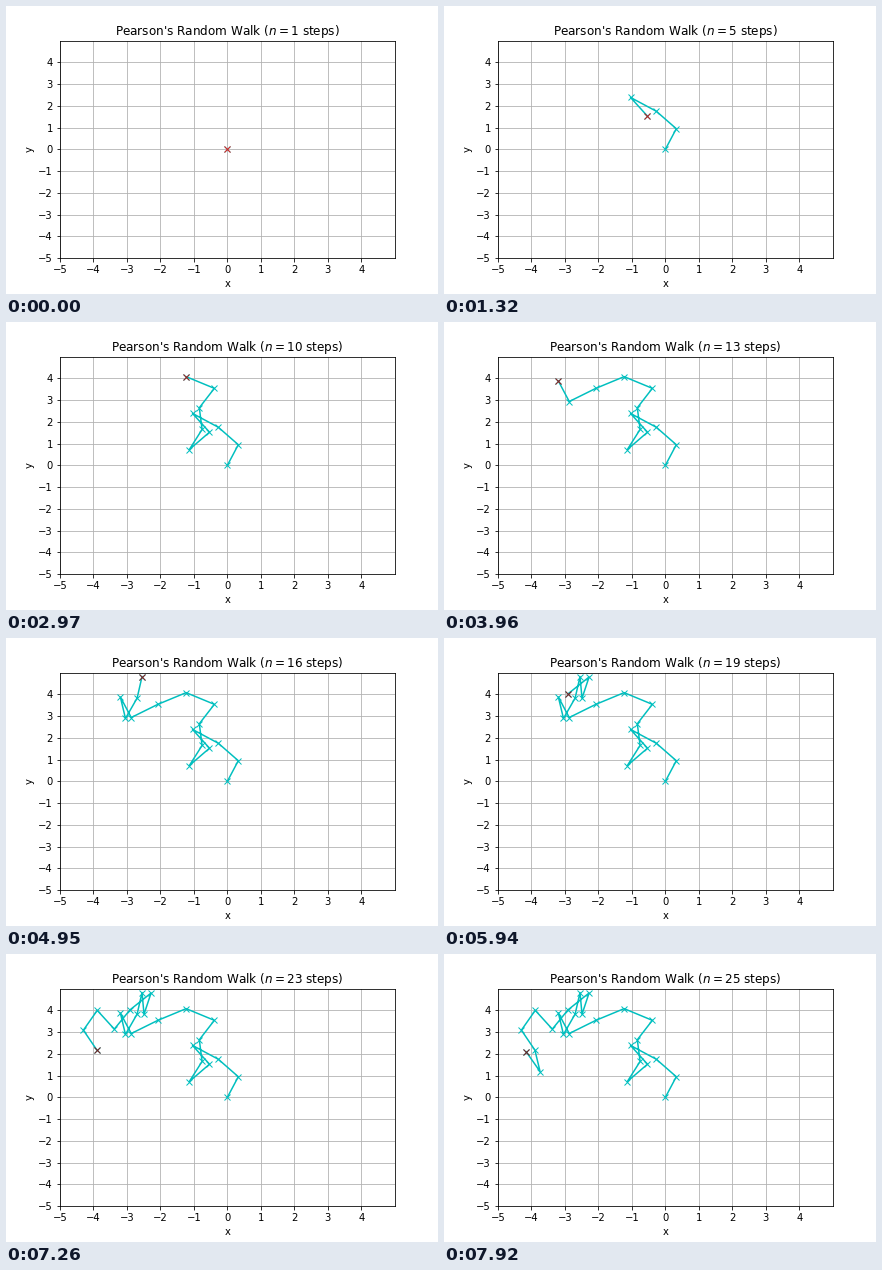
These frames come from a looping animation (432 px wide and 288 px high, 8 s). A matplotlib script:

```python
import numpy as np
import matplotlib.pyplot as plt
from matplotlib.animation import FuncAnimation

LOOP_MS = 8000
TICK_MS = 40
STEP_MS = 330

# Direction of each unit step, in degrees.
HEADINGS = np.radians([
    71, 126.6, 140.5, 300.5, 233, 67.6, 94.8, 63.3,
    147.5, 212.5, 217.3, 109, 278.8, 69.6, 81.6, 273.4,
    77.8, 230.9, 242.1, 120.6, 245.5, 293.8, 278.9, 114.5,
])
xs = np.append(0, np.cumsum(np.cos(HEADINGS)))
ys = np.append(0, np.cumsum(np.sin(HEADINGS)))

plt.rcParams["font.family"] = "DejaVu Sans"
fig, ax = plt.subplots(figsize=(6, 4), dpi=72)
fig.subplots_adjust(left=0.125, right=0.9, bottom=0.125, top=0.88)
ax.set(xlim=(-5, 5), ylim=(-5, 5), xlabel="x", ylabel="y",
       xticks=range(-5, 5), yticks=range(-5, 5))
ax.grid(True)

path, = ax.plot([], [], "cx-")
head, = ax.plot([], [], "x")
title = ax.set_title("")


def head_color(n):
    """Red at the start, fading to a dark tone."""
    return 0.42 + 0.5 * np.exp(-(n - 1) / 12), 0.1, 0.1


def draw(i):
    # A step shows in the tick during which it falls due.
    n = min((i * TICK_MS + TICK_MS - 1) // STEP_MS + 1, len(xs))
    path.set_data(xs[:n], ys[:n])
    head.set_data(xs[n - 1:n], ys[n - 1:n])
    head.set_color(head_color(n))
    title.set_text(f"Pearson's Random Walk ($n = {n}$ steps)")
    return path, head, title


anim = FuncAnimation(fig, draw, frames=LOOP_MS // TICK_MS,
                     interval=TICK_MS, repeat=True, repeat_delay=0)
plt.show()
```
